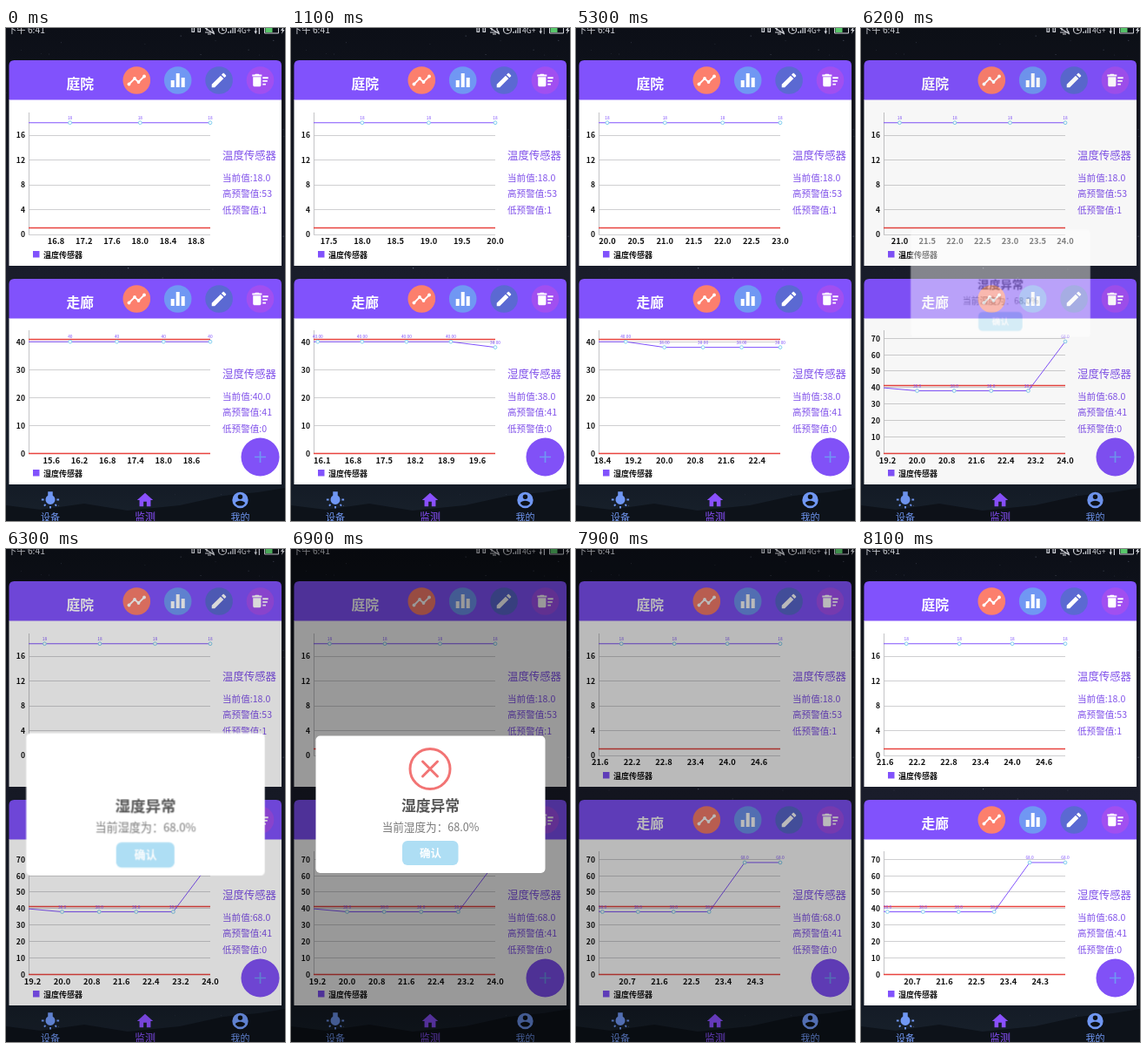
Recreate the animation shown at these times as an HTML page. Size 321 by 566 pixels, loop 8200 ms.

```html
<!DOCTYPE html>
<html lang="zh-CN">
<head>
<meta charset="utf-8">
<title>监测</title>
<style>
  html, body { margin: 0; width: 100%; height: 100%; overflow: hidden; background: #0d1019; }
  svg { display: block; width: 100vw; height: 100vh; }
  text { font-family: "Noto Sans CJK SC", "Noto Sans CJK", "Noto Sans", sans-serif; }
  .loop { animation: 8200ms step-end infinite; }
  .mid { transform-box: fill-box; transform-origin: center; }

  /* one column of readings every 400 units */
  #strip { animation-name: strip; }
  @keyframes strip {
    0% { transform: translateX(0); }
    7.31% { transform: translateX(-400px); }
    23.16% { transform: translateX(-800px); }
    40.24% { transform: translateX(-1200px); }
    57.31% { transform: translateX(-1600px); }
    74.38% { transform: translateX(-2000px); }
    90.24%, 100% { transform: translateX(-2400px); }
  }
  #uplink { animation-name: uplink; }
  @keyframes uplink {
    0%, 36.58%, 70.73% { opacity: 1; }
    13.41%, 46.34% { opacity: .55; }
    100% { opacity: 1; }
  }
  #scrim { animation-name: scrim; }
  @keyframes scrim {
    0% { opacity: 0; }
    75.6% { opacity: .03; }
    76.82% { opacity: .15; }
    78.04% { opacity: .28; }
    79.26% { opacity: .4; }
    96.34% { opacity: .27; }
    97.56% { opacity: .13; }
    98.78%, 100% { opacity: 0; }
  }
  #dialog { animation-name: dialog; transform-origin: 160.5px 293px; }
  @keyframes dialog {
    0% { opacity: 0; transform: scale(.7); }
    75.6% { opacity: .47; transform: scale(.784); }
    76.82% { opacity: 1; transform: scale(1.04); }
    78.04% { opacity: 1; transform: scale(.96); }
    79.26% { opacity: 1; transform: scale(1); }
    95.12%, 100% { opacity: 0; transform: scale(1); }
  }
  #ring { animation-name: ring; }
  @keyframes ring {
    0% { opacity: 0; transform: scaleY(.1); }
    78.04% { opacity: .3; transform: scaleY(.3); }
    79.26% { opacity: .6; transform: scaleY(.62); }
    80.48% { opacity: .85; transform: scaleY(.87); }
    81.7%, 100% { opacity: 1; transform: scaleY(1); }
  }
  #cross { animation-name: cross; }
  @keyframes cross {
    0% { opacity: 0; transform: scale(.4); }
    80.48% { opacity: .6; transform: scale(.6); }
    81.7% { opacity: 1; transform: scale(.9); }
    82.92% { opacity: 1; transform: scale(1.15); }
    84.14%, 100% { opacity: 1; transform: scale(1); }
  }
  #touch { animation-name: touch; }
  @keyframes touch {
    0% { opacity: 0; }
    92.68% { opacity: 1; }
    96.34%, 100% { opacity: 0; }
  }
</style>
</head>
<body>
<svg id="stage" viewBox="0 0 321 566" preserveAspectRatio="none">
  <defs>
    <linearGradient id="sky" x2="0" y2="1">
      <stop offset="0" stop-color="#0c0f17"/>
      <stop offset=".5" stop-color="#1a1d2b"/>
      <stop offset=".92" stop-color="#141b26"/>
      <stop offset="1" stop-color="#18212b"/>
    </linearGradient>
    <radialGradient id="dot">
      <stop offset=".75" stop-color="#fff" stop-opacity=".62"/>
      <stop offset="1" stop-color="#fff" stop-opacity=".35"/>
    </radialGradient>
    <clipPath id="plot"><rect x="26" y="90" width="209" height="410"/></clipPath>
  </defs>

  <rect width="321" height="566" fill="url(#sky)"/>
  <g id="stars" fill="#aab2cc"></g>
  <path d="M0 548L40 553 90 546 140 554 200 548 250 537 290 533 321 528V566H0Z" fill="#0d1219"/>

  <g id="status" fill="#d3d5db">
    <text x="2" y="5.500" font-size="10.300" font-weight="500">下午 6:41</text>
    <g fill="none" stroke="#d3d5db" stroke-width="1.200">
      <path d="M214 0V4.500H216.500V0M221 0V4.500H223.500V0"/>
      <path d="M229 5H239L237 2V0M231 0V3M232 7H236M229 0L240 7"/>
      <circle cx="249" cy="2" r="4.500"/>
      <path d="M249 -1V2.500H251.500"/>
      <path d="M256 6V4M258.500 6V2.500M261 6V0M263.500 6V0"/>
    </g>
    <text x="266" y="6" font-size="8.700" font-weight="500">4G+</text>
    <path d="M285.500 3.500L287.300 7 289 3.500H287.900V0H286.800V3.500Z"/>
    <path id="uplink" class="loop" d="M290.800 7V0H292V7Z"/>
    <path d="M297.500 -3H313.500V6H297.500Z" fill="none" stroke="#d3d5db"/>
    <rect x="298.500" width="8" height="5" fill="#58c76b"/>
    <path d="M318 0L316 3H318L317 7 320.500 2H318.500L319.500 0Z"/>
  </g>

  <g id="cards"></g>
  <g id="strip" class="loop"></g>

  <circle cx="292.500" cy="492.500" r="22" fill="#8151f7"/>
  <path d="M286 492.500H299M292.500 486V499" stroke="#7097f3" stroke-width="1.700"/>

  <g id="nav"></g>

  <rect id="scrim" class="loop" width="321" height="566"/>

  <g id="dialog" class="loop">
    <rect x="28.500" y="214.500" width="264" height="157.500" rx="5" fill="#fff"/>
    <g fill="none" stroke="#f27474" stroke-width="3">
      <circle id="ring" class="loop mid" cx="160" cy="252.500" r="23"/>
      <path id="cross" class="loop mid" d="M151.500 244L168.500 261M168.500 244L151.500 261" stroke-linecap="round"/>
    </g>
    <rect x="128" y="335" width="64.500" height="28" rx="6" fill="#aedef4"/>
    <g text-anchor="middle">
      <text x="160.500" y="301" font-size="16.800" font-weight="700" fill="#575757">湿度异常</text>
      <text x="160.500" y="323.500" font-size="12.600" font-weight="500" fill="#797979">当前湿度为：68.0%</text>
      <text x="160.500" y="353.500" font-size="12.500" font-weight="700" fill="#fff">确认</text>
    </g>
  </g>
  <circle id="touch" class="loop" cx="164" cy="334" r="15" fill="url(#dot)"/>
</svg>

<script>
const $ = id => document.getElementById(id);
const PURPLE = '#8152fc', INK = '#8152ea', BLUE = '#7097f3', RED = '#e8433f';

const label = (x, y, size, str, fill, extra = '') =>
  `<text x="${x}" y="${y + size * .37}" font-size="${size}" fill="${fill}" ${extra}>${str}</text>`;
const line = (x1, y1, x2, y2, color, width = 1) =>
  `<path d="M${x1} ${y1}L${x2} ${y2}" stroke="${color}" stroke-width="${width}"/>`;
const icon = (x, y, scale, d, fill) =>
  `<path transform="translate(${x} ${y}) scale(${scale}) translate(-12 -12)" d="${d}" fill="${fill}"/>`;
const crisp = v => Math.floor(v) + .5;
const MID = 'text-anchor="middle"', END = 'text-anchor="end"', BOLD = 'font-weight="700"', MEDIUM = 'font-weight="500"';

const bars = 'M10 20h4V4h-4zM4 20h4v-8H4zM16 9v11h4V9z';
const pencil = 'M3 17.250V21h3.750L17.810 9.940l-3.750-3.750zM20.710 7.040c.390-.390.390-1.020 0-1.410l-2.340-2.340c-.390-.390-1.020-.390-1.410 0l-1.830 1.830 3.750 3.750z';
const bin = 'M15 16h4v2h-4zm0-8h7v2h-7zm0 4h6v2h-6zM3 18c0 1.100.9 2 2 2h6c1.100 0 2-.9 2-2V8H3zM14 5h-3l-1-1H6L5 5H2v2h12z';
const home = 'M10 20v-6h4v6h5v-8h3L12 3 2 12h3v8z';
const user = 'M12 2a10 10 0 1 0 0 20 10 10 0 1 0 0-20zm0 3a3 3 0 1 1 0 6 3 3 0 1 1 0-6zm0 14.200c-2.500 0-4.710-1.280-6-3.220.030-1.990 4-3.080 6-3.080s5.970 1.090 6 3.080c-1.290 1.940-3.500 3.220-6 3.220z';
const bulb = 'M3.550 18.540l1.410 1.410 1.800-1.790-1.420-1.410zM11 22.450h2V19.500h-2zM4 10.500H1v2h3zM15 6.310V1.500H9v4.810a6 6 0 1 0 6 0zM20 10.500v2h3v-2zM17.240 18.160l1.790 1.800 1.410-1.410-1.790-1.800z';

// Night sky specks
let seed = 7;
const rand = () => (seed = seed * 16807 % 2147483647) / 2147483647;
$('stars').innerHTML = Array.from({ length: 130 }, () =>
  `<circle cx="${rand() * 321}" cy="${rand() * 566}" r="${.3 + rand() * .4}" opacity="${.15 + rand() * .4}"/>`).join('');

function trend(y) {
  const pts = [[141.5, 64.5], [148, 58], [152.5, 62], [159, 55.5]].map(([x, dy]) => [x, y + dy]);
  return `<polyline points="${pts.join(' ')}" fill="none" stroke="#fff" stroke-width="1.800"/>` +
    pts.map(([x, cy]) => `<circle cx="${x}" cy="${cy}" r="1.900" fill="#fff"/>`).join('');
}

function card(y, title, kind, high, low) {
  const buttons = ['#fc7f6d', BLUE, '#5b69d2', '#a14ff0']
    .map((fill, i) => `<circle cx="${150.3 + i * 47.4}" cy="${y + 60}" r="15.800" fill="${fill}"/>`).join('');
  return `<rect x="3.500" y="${y + 82}" width="313.500" height="191" fill="#fff"/>
    <path d="M3.500 ${y + 82.5}V${y + 43}q0-6 6-6H311q6 0 6 6V${y + 82.5}Z" fill="${PURPLE}"/>` +
    label(69.5, y + 64.5, 15.8, title, '#fff', BOLD) + buttons + trend(y) +
    icon(197.7, y + 60, 1, bars, '#fff') + icon(245, y + 60, .92, pencil, '#fff') + icon(292.5, y + 60, .92, bin, '#fff') +
    label(249, y + 146, 12.4, kind, INK, MEDIUM) +
    label(249, y + 190.5, 10.6, `高预警值:${high}`, INK, MEDIUM) +
    label(249, y + 209, 10.6, `低预警值:${low}`, INK, MEDIUM) +
    `<rect x="31" y="${y + 256}" width="7.500" height="7.500" fill="${PURPLE}"/>` +
    label(43, y + 260.5, 9, kind, '#111', BOLD);
}
$('cards').innerHTML = card(0, '庭院', '温度传感器', 53, 1) + card(251, '走廊', '湿度传感器', 41, 0);

$('nav').innerHTML = [[51, bulb, '设备', BLUE, 11], [160, home, '监测', '#8a50ff', 12], [269.5, user, '我的', BLUE, 11]]
  .map(([x, d, name, fill, size]) => icon(x, 542, .92, d, fill) + label(x, 562, size, name, fill, MID + ' ' + MEDIUM)).join('');

// One chart: time window from..last, value read from a function of time
function chart({ top, base, unit, ticks, from, last, value, alarms, format }) {
  const px = t => 26 + (t - from) / (last - from) * 209;
  const py = v => base - v * unit;
  let out = '';
  for (const v of ticks) {
    const y = crisp(py(v));
    out += line(26, y, 235, y, '#cfcfd1') + label(22, py(v) + .3, 8.6, v, '#111', END + ' ' + BOLD);
  }
  out += line(26.5, top, 26.5, base, '#c4c4c7');

  const step = Math.round((last - from) / 6 * 10) / 10;
  for (let n = Math.ceil(from / step); n * step <= last; n++)
    out += label(px(n * step), base + 8, 9.3, (n * step).toFixed(1), '#111', MID + ' ' + BOLD);

  const times = [];
  for (let t = Math.floor(from); t <= last; t++) times.push(t);
  const path = times.map(t => `${px(t)},${py(value(t))}`).join(' ');
  out += `<polyline points="${path}" fill="none" stroke="${PURPLE}" clip-path="url(#plot)"/>`;
  for (const v of alarms) out += line(26, crisp(py(v)), 235, crisp(py(v)), RED, 1.4);
  for (const t of times.filter(t => t >= from)) {
    const x = px(t), y = py(value(t));
    out += `<circle cx="${x}" cy="${y}" r="1.900" fill="#fff" stroke="#83cfee"/>` +
      label(x, y - 5.5, 4.8, format(value(t)), PURPLE, MID);
  }
  return out;
}

const humidity = t => t < 20 ? 40 : t < 24 ? 38 : 68;

function reading(k) {
  const last = 19 + k, alert = last > 23;
  const digits = k === 0 ? 0 : alert ? 1 : 2;
  return `<g transform="translate(${k * 400})">` +
    chart({
      top: 97, base: 237, unit: 7.125, ticks: [0, 4, 8, 12, 16],
      from: 16.41 + .86 * k, last, value: () => 18, alarms: [1], format: v => v
    }) +
    chart({
      top: 347, base: 488.2, unit: alert ? 1.886 : 3.2,
      ticks: alert ? [0, 10, 20, 30, 40, 50, 60, 70] : [0, 10, 20, 30, 40],
      from: 15.11 + .797 * k, last, value: humidity, alarms: [0, 41], format: v => v.toFixed(digits)
    }) +
    label(249, 172.5, 10.6, '当前值:18.0', INK, MEDIUM) +
    label(249, 423.5, 10.6, `当前值:${humidity(last).toFixed(1)}`, INK, MEDIUM) + '</g>';
}
$('strip').innerHTML = [0, 1, 2, 3, 4, 5, 6].map(reading).join('');
</script>
</body>
</html>
```
